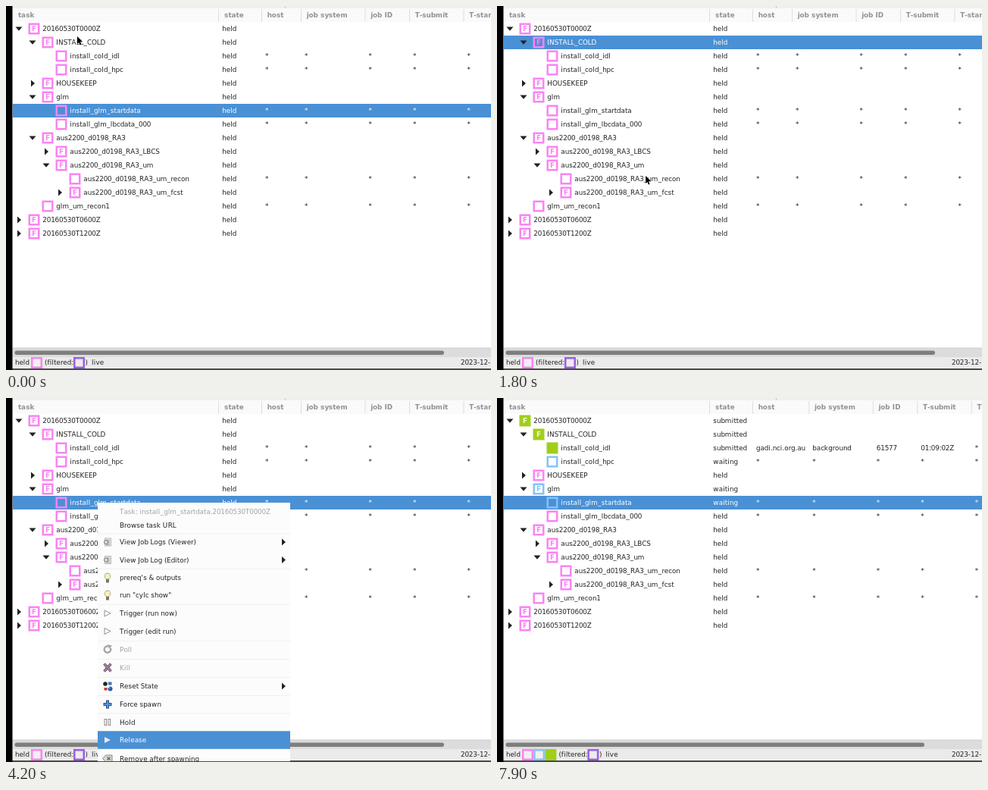
These frames come from a looping animation (640x480 px, 8000 ms). An HTML page with a canvas:

```html
<!DOCTYPE html>
<html lang="en">
<head>
<meta charset="utf-8">
<title>Task tree</title>
<style>
html, body { margin: 0; width: 100%; height: 100%; overflow: hidden; background: #fff; }
canvas { display: block; }
</style>
</head>
<body>
<canvas id="stage" width="640" height="480"></canvas>
<script>
const ctx = document.getElementById('stage').getContext('2d');
const LOOP = 8000, SCALE = 0.677;
const BLUE = '#4a90d5', INK = '#222', DIM = '#a3a3a3';
const COLORS = { held: '#fb83f3', waiting: '#83c2fb', submitted: '#a1ce1b' };

// [label, level, expander, family, released state]
const ROWS = [
  ['20160530T0000Z', 0, 'open', 1, 'submitted'],
  ['INSTALL_COLD', 1, 'open', 1, 'submitted'],
  ['install_cold_idl', 2, '', 0, 'submitted'],
  ['install_cold_hpc', 2, '', 0, 'waiting'],
  ['HOUSEKEEP', 1, 'shut', 1],
  ['glm', 1, 'open', 1, 'waiting'],
  ['install_glm_startdata', 2, '', 0, 'waiting'],
  ['install_glm_lbcdata_000', 2, '', 0],
  ['aus2200_d0198_RA3', 1, 'open', 1],
  ['aus2200_d0198_RA3_LBCS', 2, 'shut', 1],
  ['aus2200_d0198_RA3_um', 2, 'open', 1],
  ['aus2200_d0198_RA3_um_recon', 3, '', 0],
  ['aus2200_d0198_RA3_um_fcst', 3, 'shut', 1],
  ['glm_um_recon1', 1, '', 0],
  ['20160530T0600Z', 0, 'shut', 1],
  ['20160530T1200Z', 0, 'shut', 1]
];
const JOB = ['gadi.nci.org.au', 'background', '61577', '01:09:02Z', '*'];
const HEADS = ['host', 'job system', 'job ID', 'T-submit', 'T-start'];

// [label, centre y, icon, look]
const COMMON = [
  ['Poll', 119.5, 'poll', 'dim'],
  ['Kill', 143.5, 'kill', 'dim'],
  ['Reset State', 168, 'reset', 'sub'],
  ['Force spawn', 192, 'plus'],
  ['Hold', 215.5, 'pause'],
  ['Release', 239, 'play'],
  ['Remove after spawning', 263.5, 'erase']
];
const FAMILY_MENU = {
  x: 95, y: 44, w: 227, h: 278,
  lines: [84, 107.5, 131.5, 155.5, 180, 204, 251, 298.5],
  items: [
    ['Task: INSTALL_COLD.20160530T0000Z', 55, '', 'dim'],
    ['Browse task URL', 74],
    ['Trigger (run now)', 95.5, 'play'],
    ...COMMON,
    ['Remove without spawning', 287, 'erase'],
    ['Toggle Family Grouping', 310, 'check']
  ]
};
const TASK_MENU = {
  x: 121, y: 138, w: 254, h: 341,
  lines: [178.5, 225, 272, 320, 344, 368, 392, 415.5],
  items: [
    ['Task: install_glm_startdata.20160530T0000Z', 149.5, '', 'dim'],
    ['Browse task URL', 168],
    ['View Job Logs (Viewer)', 190, 'log', 'sub'],
    ['View Job Log (Editor)', 213.5, 'log', 'sub'],
    ["prereq's & outputs", 237, 'bulb'],
    ['run "cylc show"', 260, 'bulb'],
    ['Trigger (run now)', 284, 'play'],
    ['Trigger (edit run)', 307.5, 'play'],
    ...COMMON.map(([s, y, ...rest]) => [s, y + 212, ...rest])
  ]
};

// [time, x, y]
const POINTER = [
  [0, 94, 40], [900, 94, 40], [1100, 180, 196], [1200, 206, 231], [1300, 206, 235],
  [1700, 206, 235], [2600, 118, 136], [3100, 118, 136], [3300, 299, 317], [3600, 273, 336], [3900, 273, 336]
];
// [start, highlighted item]
const HOVERS = [
  [0, ''], [1000, 'Trigger (run now)'], [1100, 'Force spawn'], [1200, 'Remove after spawning'],
  [1300, 'Release'], [3100, ''], [3300, 'Trigger (run now)'], [3400, 'Hold'], [3500, 'Release']
];

function rect(x, y, w, h, color) {
  ctx.fillStyle = color;
  ctx.fillRect(x, y, w, h);
}

function poly(points, fill, line, width = 1) {
  ctx.beginPath();
  points.forEach(([x, y]) => ctx.lineTo(x, y));
  ctx.closePath();
  if (fill) { ctx.fillStyle = fill; ctx.fill(); }
  if (line) { ctx.strokeStyle = line; ctx.lineWidth = width; ctx.stroke(); }
}

function stroke(points, color, width) {
  ctx.beginPath();
  points.forEach(([x, y]) => ctx.lineTo(x, y));
  ctx.strokeStyle = color;
  ctx.lineWidth = width;
  ctx.stroke();
}

function disc(x, y, r, color) {
  ctx.beginPath();
  ctx.arc(x, y, r, 0, 7);
  ctx.fillStyle = color;
  ctx.fill();
}

// Whole-pixel advances at 13px, then scaled, like hinted desktop text.
const advances = new Map();
function advance(ch, weight) {
  const key = weight + ch;
  if (!advances.has(key)) {
    ctx.font = `${weight} 13px "DejaVu Sans", sans-serif`;
    advances.set(key, Math.round(ctx.measureText(ch).width) * SCALE);
  }
  return advances.get(key);
}

function text(s, x, cy, color = INK, weight = 'normal') {
  const steps = [...s].map(ch => advance(ch, weight));
  ctx.font = `${weight} ${13 * SCALE}px "DejaVu Sans", sans-serif`;
  ctx.fillStyle = color;
  [...s].forEach((ch, i) => {
    ctx.fillText(ch, x, cy + 3.2);
    x += steps[i];
  });
}

function stateBox(cx, cy, color, fill, family, solid) {
  rect(cx - 7.5, cy - 7.5, 15, 15, color);
  if (!solid) rect(cx - 5, cy - 5, 10, 10, fill);
  if (family) {
    ctx.font = 'bold 9px "DejaVu Sans", sans-serif';
    ctx.fillStyle = solid ? '#f4fbd8' : color;
    ctx.fillText('F', cx - 3, cy + 3.3);
  }
}

function expander(kind, x, y) {
  if (kind === 'open') poly([[x - 4.5, y - 2.5], [x + 4.5, y - 2.5], [x, y + 2.7]], INK);
  if (kind === 'shut') poly([[x - 2, y - 4.5], [x + 3, y], [x - 2, y + 4.5]], INK);
}

function drawHeader(cols) {
  rect(8, 0, 632, 21, '#fafafa');
  rect(8, 0, 632, 3, '#efefef');
  rect(368, 0, 1, 3, '#c4c4c4');
  const gray = '#929292';
  text('task', 16, 12, gray, 'bold');
  text('state', 288, 12, gray, 'bold');
  rect(280, 4, 1, 17, '#dedede');
  cols.forEach((x, i) => {
    rect(x, 4, 1, 17, '#dedede');
    text(HEADS[i], x + 7.7, 12, gray, 'bold');
  });
}

function drawRows(selected, released, cols) {
  ROWS.forEach(([label, level, exp, family, next], i) => {
    const y = 30 + 18 * i, x = 37 + 18 * level;
    const on = label === selected;
    const ink = on ? '#fff' : INK;
    const state = released && next || 'held';
    if (on) rect(9, y - 9, 631, 18, BLUE);
    expander(exp, x - 20, y);
    stateBox(x, y, COLORS[state], on ? BLUE : '#fff', family, state === 'submitted');
    text(label, x + 11.3, y, ink);
    text(state, 285.3, y, ink);
    if (family) return;
    const job = released && state === 'submitted';
    cols.forEach((cx, k) => text(job ? JOB[k] : '*', cx + 5, y, ink));
  });
}

function drawFooter(states, thumb) {
  rect(8, 451, 632, 12, '#dcdcdc');
  rect(8, 450.5, 632, 1, '#cdcdcd');
  ctx.beginPath();
  ctx.roundRect(11.5, 454.5, thumb - 11.5, 5.5, 2.7);
  ctx.fillStyle = '#7e7e7e';
  ctx.fill();
  rect(8, 463, 632, 15, '#ebebeb');
  rect(8, 478, 632, 2, '#4a4a4a');
  text('held', 12, 470);
  states.forEach((s, i) => stateBox(40.5 + 15.2 * i, 470.5, COLORS[s], '#f0f0f0', 0, s === 'submitted'));
  const x = 51 + 15.2 * (states.length - 1);
  text('(filtered:', x, 470);
  stateBox(x + 45.5, 470.5, '#9a5fe6', '#ececec');
  text(')', x + 53.5, 470);
  text('live', x + 62, 470);
  text('2023-12-', 600, 470);
}

const ICONS = {
  play(x, y, on) {
    const p = [[x - 4, y - 4], [x + 4, y], [x - 4, y + 4]];
    on ? poly(p, '#e4e9ee') : poly(p, '#fff', '#8c8c8c');
  },
  poll(x, y) {
    ctx.beginPath();
    ctx.arc(x, y, 4.3, -0.4, 4.9);
    ctx.strokeStyle = '#a5a5a5';
    ctx.lineWidth = 2.4;
    ctx.stroke();
    poly([[x, y - 6.5], [x + 6, y - 5], [x + 2, y - 0.5]], '#a5a5a5');
  },
  kill(x, y) {
    for (const s of [-1, 1]) {
      stroke([[x - 4.5 * s, y - 5], [x + 4.5 * s, y + 5]], '#75606f', 3.6);
      stroke([[x - 4 * s, y - 4.5], [x + 4 * s, y + 4.5]], '#a48b9e', 1.6);
    }
  },
  reset(x, y) {
    disc(x - 3, y - 3, 2.8, '#242424');
    disc(x + 3.5, y + 3.5, 3, '#2d5ca8');
    rect(x + 1, y - 5.5, 4.5, 4, '#3f70bd');
    rect(x - 4.5, y + 2, 4, 3.5, '#c63b32');
    stroke([[x - 1, y - 1], [x + 3, y + 3]], '#fff', 1);
  },
  plus(x, y) {
    rect(x - 5.5, y - 2, 11, 4, '#28518f');
    rect(x - 2, y - 5.5, 4, 11, '#28518f');
    rect(x - 4.5, y - 1, 9, 2, '#5d92d4');
    rect(x - 1, y - 4.5, 2, 9, '#5d92d4');
  },
  pause(x, y) {
    ctx.strokeStyle = '#8c8c8c';
    ctx.lineWidth = 1;
    ctx.strokeRect(x - 4, y - 4, 2.6, 8);
    ctx.strokeRect(x + 1, y - 4, 2.6, 8);
  },
  erase(x, y) {
    poly([[x - 6.5, y], [x - 2.5, y - 4.5], [x + 6, y - 4.5], [x + 6, y + 4.5], [x - 2.5, y + 4.5]], '#d9d9d2', '#85857e');
    for (const s of [-2, 2]) stroke([[x - 0.5, y - s], [x + 3.5, y + s]], '#63635f', 1.3);
  },
  check(x, y) {
    ctx.beginPath();
    ctx.roundRect(x - 4.5, y - 5.5, 11, 11, 2);
    ctx.strokeStyle = '#333';
    ctx.lineWidth = 1.3;
    ctx.stroke();
    stroke([[x - 2, y], [x + 0.5, y + 2.8], [x + 5, y - 3.5]], '#222', 2);
  },
  bulb(x, y) {
    disc(x, y - 2, 4.4, '#a8a78c');
    disc(x, y - 2, 3.5, '#f4f1b8');
    rect(x - 2, y + 2, 4, 4.5, '#77766d');
  },
  log(x, y) {
    rect(x - 4, y - 5.5, 9, 11, '#b9b9b4');
    rect(x - 3, y - 4.5, 7, 9, '#e9e9e6');
    for (let k = -3; k < 4; k += 2) rect(x - 2, y + k, 5, 0.8, '#8d8d8d');
    disc(x - 2, y, 3, '#83837f');
    disc(x - 2, y, 1.9, '#dce2e6');
  }
};

function drawMenu({ x, y, w, h, lines, items }, hover) {
  ctx.save();
  ctx.beginPath();
  ctx.rect(x, y, w, h);
  ctx.clip();
  rect(x, y, w, h, '#fcfcfc');
  lines.forEach(ly => rect(x, ly, w, 1, '#f0f0f0'));
  for (const [label, cy, icon, look] of items) {
    const on = label === hover;
    if (on) rect(x, cy - 11.8, w, 23.6, BLUE);
    if (icon) ICONS[icon](x + 13, cy, on);
    text(label, x + 29, cy, on ? '#fff' : look === 'dim' ? DIM : INK);
    if (look === 'sub') poly([[x + w - 11, cy - 4.5], [x + w - 6, cy], [x + w - 11, cy + 4.5]], INK);
  }
  ctx.restore();
}

function drawPointer(t) {
  if (t >= 3900) return;
  const i = POINTER.findIndex(([at]) => at > t);
  const [t0, x0, y0] = POINTER[i - 1], [t1, x1, y1] = POINTER[i];
  const k = (t - t0) / (t1 - t0);
  const x = x0 + (x1 - x0) * k, y = y0 + (y1 - y0) * k;
  const shape = [[0, 0], [0, 10], [2.2, 8], [3.8, 11.5], [5.3, 10.8], [3.8, 7.3], [7, 7.3]];
  poly(shape.map(([a, b]) => [x + a, y + b]), '#000', '#fff', 0.8);
  poly(shape.map(([a, b]) => [x + a, y + b]), '#000');
}

function draw(t) {
  const released = t >= 6000;
  const cols = [337, 389, 473.5, 532, 603.5].map((x, i) => released && i ? x + 22.3 : x);
  const selected = t >= 400 && t < 3100 ? 'INSTALL_COLD' : 'install_glm_startdata';
  const hover = HOVERS.filter(([at]) => at <= t).pop()[1];
  rect(0, 0, 640, 480, '#fff');
  drawHeader(cols);
  drawRows(selected, released, cols);
  drawFooter(t < 5900 ? ['held'] : ['held', 'waiting', 'submitted'], released ? 564 : 578);
  rect(0, 0, 8.5, 480, '#000');
  if (t >= 400 && t < 1800) drawMenu(FAMILY_MENU, hover);
  if (t >= 3100 && t < 5000) drawMenu(TASK_MENU, hover);
  drawPointer(t);
}

const start = performance.now();
function tick() {
  const t = (performance.now() - start) % LOOP;
  draw(Math.floor(t / 100) * 100);
  requestAnimationFrame(tick);
}
tick();
</script>
</body>
</html>
```
